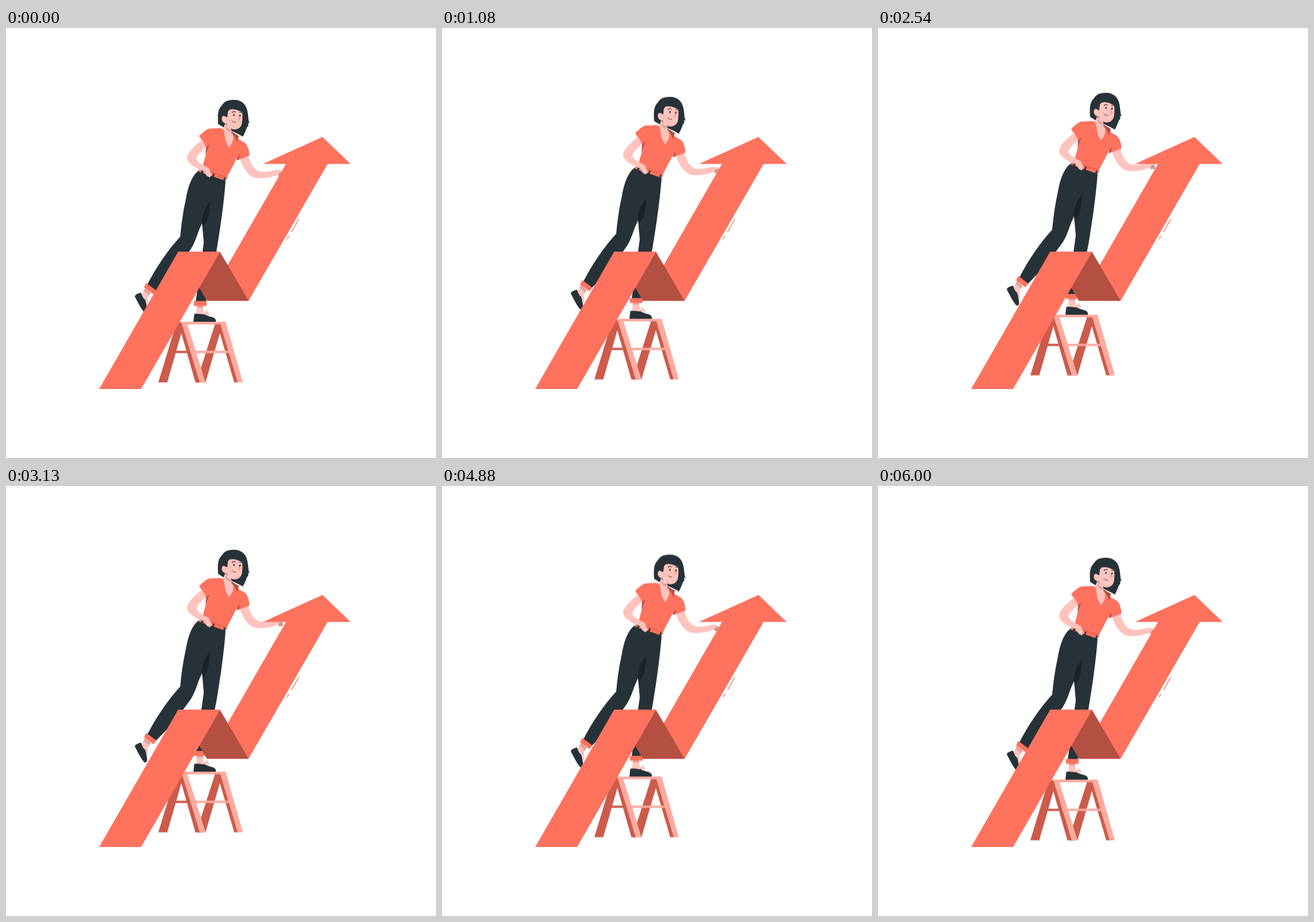
Write an HTML page without scripts that moves like this. It is 748 by 748 pixels and loops after 6.04 s.

```html
<!DOCTYPE html>
<html lang="en">
<head>
<meta charset="utf-8">
<title>Growth</title>
<style>
  html, body { margin: 0; width: 100%; height: 100%; overflow: hidden; background: #fff; }
  svg { display: block; width: 100vw; height: 100vh; }
  .coral { fill: #ff725e; }
  .fold { fill: #b35042; }
  .dark { fill: #263238; }
  .shade { fill: #192226; }
  .skin { fill: #ffc3bd; }
  .skin-dim { fill: #dca59f; }
  .light { fill: #ffaa9e; }
  .mid { fill: #cc5b4b; }
  .line { fill: none; stroke: #263238; stroke-linecap: round; }
  .red { fill: none; stroke: #ff725e; stroke-linecap: round; }
  .lift { animation: lift 6040ms linear infinite; }
  @keyframes lift {
    50% { transform: translateY(-14.6px); }
  }
</style>
</head>
<body>
<svg viewBox="0 0 748 748">
  <g class="lift">
    <!-- ladder -->
    <g id="ladder">
      <path class="mid" d="M297 511H311L305 531L280.500 616.500H265ZM365 511H378L372 531L347 616.500H331Z"/>
      <path class="mid" d="M294 561.500H316V565.500H293Z"/>
      <path class="mid" d="M302 511L305 531L329.500 616.500H338L306 511ZM369 513L372 531L397 616.500H404L373 513Z"/>
      <path class="light" d="M328 561.500H388V565.500H329Z"/>
      <path class="light" d="M302 511H382L412 616.500H403L373 515.500H315.500L347 616.500H337L306 515Z"/>
    </g>

    <!-- back foot -->
    <path class="skin" d="M242 453L252 461L244 474L235 464Z"/>
    <path class="skin-dim" d="M242 453L252 461L249 465L239 457Z"/>
    <path class="dark" d="M224 467C224 464 231 461 235 460.500C237 468 240 471 242.500 473C244 480 246 488 245.500 493L242 495.500C236 492 229 476 224 467Z"/>
    <path class="red" stroke-width="1" d="M242 474C247 470 249 475 243 477C248 478 248 483 244 481"/>

    <!-- front foot -->
    <path class="skin" d="M332 482H343L344 498L338 500L331 498Z"/>
    <path class="skin-dim" d="M332 482H343V486.500H332Z"/>
    <path class="dark" d="M326 511L327.500 497.500C333 496 338 498 345 498C352 502 359 502 363 505C365 507 365.500 509 365 511Z"/>
    <path class="red" stroke-width="1" d="M345 498C346 491 352 491 350 495L346 498C352 494 356 497 351 499"/>

    <!-- trousers -->
    <path class="dark" d="M341 340L344 373L330 476H347.500L366 389C373 347 379 305 382 266L335 248C321 259 316 281 313 297C308 319 305 341 303 363C281 387 262 415 246 446L260 458C282 437 304 410 322 384C331 369 332 358 341 340Z"/>
    <path class="shade" d="M355 301C349 311 341 320 341 337L343 345C352 336 355 320 355 301Z"/>
    <path class="coral" d="M244 443.500L261 456.500L257 463.500L240 451.500ZM327 475H349V483.500H327Z"/>

    <!-- right arm -->
    <path class="skin" d="M406 226L421 222C425 235 430 245 440 249.500C450 251.500 460 249 467 247.500C472 246 478 247 482 249V258H476L471 256C458 261 442 263 431 260C418 254 412 241 406 226Z"/>
    <path fill="#b99d99" d="M475 252L480 250L482 257.500H474Z"/>

    <!-- shirt -->
    <path class="coral" d="M371 174C363 175 357 174 352 175.500C346 178 340 184 336 188L348 207.500L352 204L342 241L336 247L335 250L383 266L385 258L403 224L405 229L423.500 222C423 211 420 204 416 200C410 196 406 195 402 191L391 179Z"/>
    <path class="fold" d="M348 207.500L354 202L347 221ZM403 224L407 220L405 229L401 230Z"/>
    <path class="fold" d="M390 179L405 188L402 199L393 191Z"/>
    <path class="dark" d="M341 247L344 248L342 253L339 252ZM360.500 253L363 254L361 259.500L358.500 258.500ZM379.500 260L382 261L380 267L377.500 266Z"/>
    <path fill="none" stroke="#b35042" stroke-width=".7" d="M342 246L385 260"/>

    <!-- left arm -->
    <path class="skin" d="M341 194C331 203 318 213 315 224C314 233 323 239 334 245L344 249L349 257L354 260L358 256L353 244C345 239 334 236 331 227C334 219 342 213 348 207Z"/>

    <!-- hair, neck, face -->
    <path class="dark" d="M369 167C368 151 368 142 376 134C380 127 388 124.500 397 125C410 125 418 133 420 145C422 154 421 161 424 166L421 165C422 169 421 174 420 171C417 178 415 184 412 189C406 185 398 182 390 178L377 172Z"/>
    <path class="skin" d="M381 166L377 178C381 185 379 195 388 208C395 199 399 192 393 182L391 174Z"/>
    <path class="coral" d="M371 174L378 176C382 186 379 198 388 208L383 204L372 183Z"/>
    <path class="coral" d="M392 180C398 189 396 198 388 208L403 196L401 188Z"/>
    <path class="fold" d="M392 180L405 188L402 198C399 190 396 186 392 183Z"/>
    <path class="skin-dim" d="M382 170C386 175 390 177 393 178L388 181C384 178 381 174 382 170Z"/>
    <path class="skin" d="M386 143C391 139 399 141 409 140C412 147 412 159 410 168C406 178 394 179 387 172L383 166C377 166 374 159 376 155C378 151 383 152 385 156Z"/>
    <path class="dark" d="M384 155C385 150 385 145 389 142C397 140 404 143 411 147L411 138L396 133L381 138L379 153Z"/>
    <path class="line" stroke-width="1.300" d="M393.500 147C395 145 397 145 399 146M406.500 146.500L410 147.500"/>
    <ellipse class="dark" cx="396.500" cy="151.500" rx="1.200" ry="1.900"/>
    <ellipse class="dark" cx="407" cy="152.500" rx="1.100" ry="1.900"/>
    <path class="red" stroke-width="1" d="M404.500 153L407 159L404.500 160"/>
    <path class="line" stroke-width="1" d="M393 161.500C395 164 398 164.500 400 163.500"/>
  </g>

  <!-- arrow -->
  <g id="arrow">
    <path class="coral" d="M350 474.500L487 236.500H447L550.500 189.500L599.500 236.500H559.500L422 474.500Z"/>
    <path class="fold" d="M299 389H372L422 474.500H349.500Z"/>
    <path class="coral" d="M162 628L299.500 389H372.500L235 628Z"/>
    <path class="red" stroke-width="1.400" d="M509 333L497 354.500M492 362L489 367"/>
  </g>
</svg>
</body>
</html>
```
